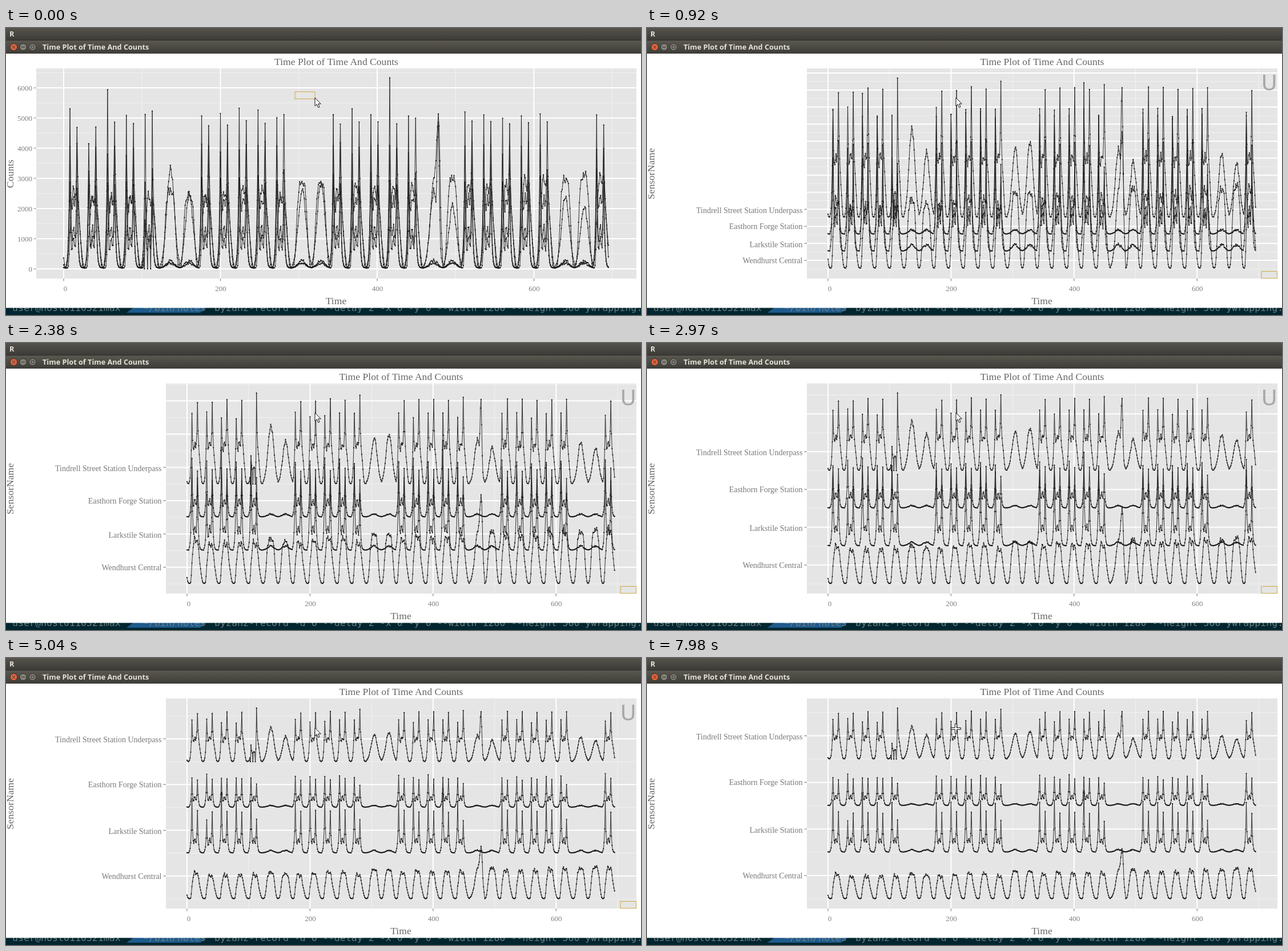
An HTML page for the animation above (8 s loop, 1112 px wide and 504 px high).

```html
<!DOCTYPE html>
<html lang="en">
<head>
<meta charset="utf-8">
<title>Time plot</title>
<style>
html, body { margin: 0; width: 1112px; height: 504px; overflow: hidden; background: #fff; }
svg { display: block; }
.bar { font: bold 12.7px "Open Sans", "Noto Sans", sans-serif; fill: #e6e3da; }
.term { font: 16.6px "DejaVu Sans Mono", monospace; fill: #6b7f83; }
.title, .tick, .name { font: 17.6px "Liberation Serif", serif; fill: #666; text-anchor: middle; }
.tick { font-size: 13px; fill: #7f7f7f; }
.name { font-size: 14px; fill: #7a7a7a; text-anchor: end; }
.key { font: 38px "DejaVu Sans", sans-serif; fill: #a8a8a8; text-anchor: end; }
.major { stroke: #fff; stroke-width: 2; }
.minor { stroke: #f0f0f0; stroke-width: 1.2; }
.mark { stroke: #888; stroke-width: 1.2; }
.line { fill: none; stroke: #1c1c1c; stroke-width: .9; stroke-linejoin: bevel; }
.dots { fill: none; stroke: #1c1c1c; stroke-width: 2.3; stroke-linecap: round; }
</style>
</head>
<body>
<svg width="1112" height="504" viewBox="0 0 1112 504">
  <defs>
    <linearGradient id="panelBar" x2="0" y2="1">
      <stop stop-color="#55534b"/><stop offset="1" stop-color="#3c3b37"/>
    </linearGradient>
    <linearGradient id="titleBar" x2="0" y2="1">
      <stop stop-color="#5b5950"/><stop offset="1" stop-color="#3d3c38"/>
    </linearGradient>
    <clipPath id="panelClip"><rect id="clipBox" y="71" height="369"/></clipPath>
  </defs>
  <rect y="488" width="1112" height="16" fill="#02262f"/>
  <path d="M223 491H351L340 500H211Z" fill="#1d5a8c"/>
  <g class="term">
    <text x="11" y="496.5">user@host0110321max</text>
    <text x="240" y="496.5">~/bin/notes</text>
    <text x="365" y="496.5">byzanz-record -d 6 --delay 2 -x 0 -y 0 --width 1280 --height 560 ywrapping.gif</text>
  </g>
  <rect y="45" width="1112" height="446.5" fill="#fff"/>
  <rect width="1112" height="21" fill="url(#panelBar)"/>
  <rect y="21" width="1112" height="24" fill="url(#titleBar)"/>
  <path d="M0 21.5H1112" stroke="#2f2e2b"/>
  <g class="bar"><text x="6" y="15">R</text><text x="64" y="38">Time Plot of Time And Counts</text></g>
  <g stroke="#34332f">
    <circle cx="13.5" cy="33.5" r="6.2" fill="#e0633c"/>
    <circle cx="30" cy="33.5" r="6" fill="#85827a"/>
    <circle cx="46.5" cy="33.5" r="6" fill="#85827a"/>
    <path d="M11 31l5 5m0-5l-5 5M27 33.5h6M44 31h5v5h-5z" fill="none"/>
  </g>
  <g id="plot"></g>
</svg>
<script>
const LOOP = 8000, HOURS = 696, TOP = 88, BASE = 423, SHIFT = 3.19;
const shiftTimes = [380, 920, 1320, 1600, 2080, 2380, 2680, 2970, 3570, 3860, 4090, 4400, 4780, 5040, 5420];
const names = ['Wendhurst Central', 'Larkstile Station', 'Easthorn Forge Station', 'Tindrell Street Station Underpass'];
const nameDrop = [5, 6.5, 5, 6.5];

const random = n => { const v = Math.sin((n + 1) * 12.9898) * 43758.5453; return v - Math.floor(v); };
const bump = (h, mid, width, power = 2) => Math.exp(-(Math.abs((h - mid) / width) ** power));
const spike = (h, mid) => bump(h, mid, 1.2, 1);

// Hourly counts in hundreds; h runs from 4 to 27, so each day starts at 4 am.
const eventDay = 19, unusualOfficeAm = { 1: 32, 2: 59, 17: 63 };
const streetWeekend = [33, 24, 26.5, 28.5, 25, 20.5, 24, 20.5];

function city(day, h, weekend) {
  if (day === eventDay) return 29 * bump(h, 17, 7) + 34 * bump(h, 22.3, 2.8);
  const peak = 23 + .01 * day * day + 3.5 * random(day);
  if (weekend) return peak * bump(h, 16, 7.5, 4);
  return peak * (bump(h, 14.2, 5.7, 4) + .2 * bump(h, 8, 1.2) + .3 * bump(h, 21.5, 2.6) - .12 * bump(h, 14.7, 1.6));
}

function office(day, h, weekend, friday) {
  if (weekend) return 2.4 * bump(h, 16, 7);
  const am = unusualOfficeAm[day] || 49 + 4 * random(day);
  const pm = (friday ? 31 : 39) + 3 * random(day + 30);
  return am * spike(h, 8) + pm * spike(h, 17) + 12 * bump(h, 12.7, 1.8);
}

function terminal(day, h, weekend, friday) {
  if (weekend) return 1.6 * bump(h, 16, 7);
  const am = 28 + 5 * random(day + 60), pm = (friday ? 21 : 26) + 2 * random(day + 90);
  return am * spike(h, 8) + pm * spike(h, 17) + 9 * bump(h, 12.7, 1.8);
}

function street(day, h, weekend, friday) {
  const week = Math.floor(day / 7);
  if (weekend) {
    const crowd = day === eventDay ? 36 * bump(h, 22, 1.7) : 0;
    return streetWeekend[week * 2 + day % 7 - 5] * bump(h, 16.3, 6.8) + crowd;
  }
  const am = 39 + 4 * random(day + 120), pm = friday ? 52 - 1.2 * week : 46.5 + 2.5 * random(day + 150);
  return (am - 13) * spike(h, 8) + (pm - 15) * spike(h, 17) + 15 * bump(h, 14.5, 8, 6) + 7 * bump(h, 12.7, 1.5);
}

const data = [city, office, terminal, street].map((rule, s) => Array.from({ length: HOURS }, (_, x) => {
  const day = Math.max(0, Math.floor((x - 4) / 24));
  const h = x < 4 ? x + 24 : x - day * 24;
  const weekday = day % 7, weekend = weekday > 4;
  const jitter = h === 8 || h === 17 || h === 22 ? 0 : weekend && (s === 1 || s === 2) ? .5 : .13;
  const v = .3 + rule(day, h, weekend, weekday === 4) * (1 + jitter * (random(x + s * 1000) - .5));
  const faulty = rule === street && day === 4 && h < 17;
  return faulty ? (h % 4 === 3 ? 0 : v * .4) : v;
}));
const peaks = data.map(values => Math.max(...values));

const text = (cls, x, y, s, extra = '') => `<text class="${cls}" x="${x}" y="${y}" ${extra}>${s}</text>`;
const path = (cls, d) => `<path class="${cls}" d="${d}"/>`;

function cursor(cross) {
  const d = cross
    ? 'M539.5 115.5h3v7h7v3h-7v7h-3v-7h-7v-3h7z'
    : 'M541 122.5v14.5l3.3-3 2.4 5.6 2.4-1-2.4-5.4h4.5z';
  return `<path d="${d}" fill="#fff" stroke="#111"/>`;
}

function draw(n, key, brush, cross) {
  const left = n ? 280 : 53, x0 = n ? 317 : 101, step = n ? 1.0772 : 1.3725;
  const mid = (left + 1104) / 2, shift = n * SHIFT;
  const scale = n ? (BASE - TOP) / Math.max(...peaks.map((p, i) => p + i * shift)) : 5.3;
  const px = x => x0 + x * step, py = v => BASE - v * scale;
  const gap = n ? shift : 10, first = n ? gap / 2 : 0;
  const grid = { minor: '', major: '' };
  let marks = '', labels = '', curves = '';

  for (let x = 0; x <= 700; x += 100) {
    const major = x % 200 === 0;
    grid[major ? 'major' : 'minor'] += `M${px(x)} 71V440`;
    if (!major) continue;
    marks += `M${px(x)} 440v4.5`;
    labels += text('tick', px(x) + (x ? .5 : 3), 461.5, x);
  }
  for (let v = first, i = 0; py(v - gap / 2) > 71; v += gap, i++) {
    grid.major += `M${left} ${py(v)}H1104`;
    grid.minor += `M${left} ${py(v + (n ? -gap : gap) / 2)}H1104`;
    if (i > (n ? 3 : 6)) continue;
    marks += `M${left - 4.5} ${py(v)}h4.5`;
    labels += n
      ? text('name', 272.5, py(v) + nameDrop[i], names[i])
      : text('tick', 46, py(v) + 4.5, i * 1000, 'style="text-anchor:end"');
  }
  data.forEach((values, s) => {
    const points = values.map((v, x) => px(x).toFixed(1) + ' ' + py(v + s * shift).toFixed(1));
    curves += path('line', 'M' + points.join('L')) + path('dots', points.map(p => `M${p}h0`).join(''));
  });

  const box = n ? 'x="1076" y="427.5" width="27.5" height="12"' : 'x="506" y="112" width="35" height="12.5"';
  clipBox.setAttribute('x', left);
  clipBox.setAttribute('width', 1104 - left);
  plot.innerHTML =
    `<rect x="${left}" y="71" width="${1104 - left}" height="369" fill="#e5e5e5"/>` +
    `<g clip-path="url(#panelClip)">${path('minor', grid.minor)}${path('major', grid.major)}${curves}</g>` +
    path('mark', marks) + labels +
    text('title', mid, 65, 'Time Plot of Time And Counts') +
    text('title', mid - .5, 485, 'Time') +
    text('title', 0, 0, n ? 'SensorName' : 'Counts', 'transform="translate(13 256)rotate(-90)"') +
    text('key', 1103.5, 108.5, key) +
    (brush ? `<rect ${box} fill="none" stroke="#d0ae52" stroke-width="1.1"/>` : '') +
    cursor(cross);
}

const start = performance.now();
let shown;
function frame() {
  const t = (performance.now() - start) % LOOP;
  const n = shiftTimes.filter(s => s <= t).length;
  const key = t >= 380 && t < 5560 ? 'U' : t >= 6390 && t < 7540 ? 'M' : '';
  const state = [n, key, t < 6390, t >= 7870];
  if (String(state) !== shown) {
    shown = String(state);
    draw(...state);
  }
  requestAnimationFrame(frame);
}
frame();
</script>
</body>
</html>
```
